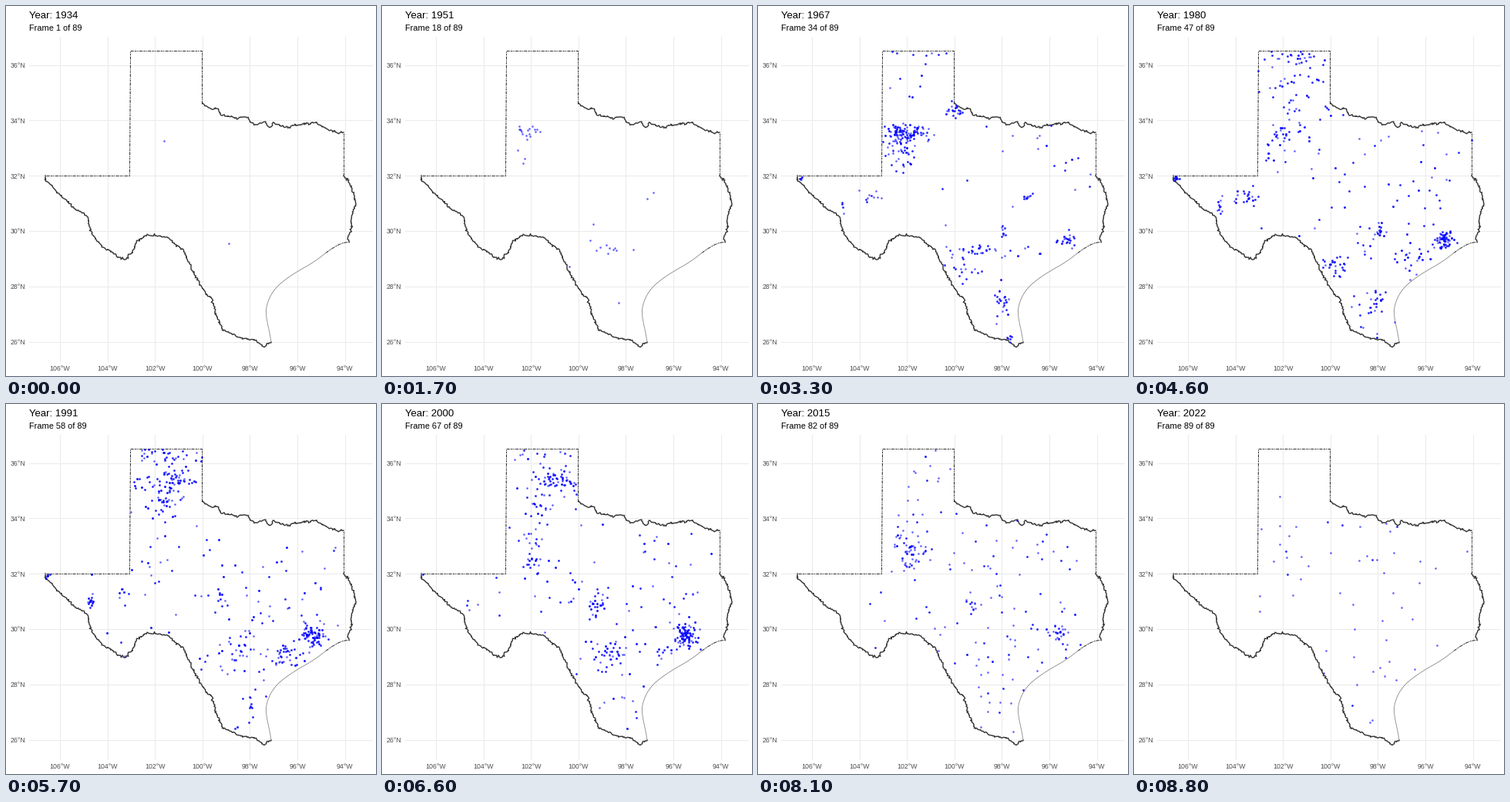
Animation, 480 px wide and 480 px high, one loop 8.9 s. Source, as a matplotlib script:

```python
import numpy as np
import matplotlib.pyplot as plt
from matplotlib.animation import FuncAnimation
from matplotlib.path import Path

SIZE, DPI = 480, 80
PT = 72 / DPI  # points per pixel
FRAMES, FIRST_YEAR = 89, 1934
GRID, TICK, BANK, BLACK = "#ebebeb", "#4d4d4d", "#383838", "#1c1c1c"
plt.rcParams["font.family"] = ["Liberation Sans", "DejaVu Sans"]

# Key points of each border piece, in stage pixels
RIO = [(51, 220), (51, 226), (58, 231), (66, 241), (87, 261), (105, 272),
       (110, 291), (117, 304), (127, 314), (138, 319), (145, 325), (156, 329),
       (165, 317), (170, 305), (184, 297), (209, 300), (219, 309), (230, 316),
       (236, 330), (249, 357), (261, 375), (268, 379), (272, 400), (281, 420),
       (305, 431), (325, 434), (334, 442), (344, 436)]
COAST = [(344, 436), (342, 424), (338, 406), (337, 392), (343, 375),
         (354, 361), (375, 346), (400, 332), (419, 317), (434, 308),
         (445, 306)]
SABINE = [(445, 306), (443, 301), (448, 291), (448, 273), (454, 257),
          (451, 244), (445, 228), (438, 220)]
RED = [(254.5, 127), (266, 134), (275, 133), (279, 141), (300, 146),
       (305, 144), (315, 145), (317, 152), (325, 154), (336, 150), (343, 158),
       (347, 152), (366, 158), (373, 155), (402, 151), (412, 158), (428, 164),
       (438, 164)]
PANHANDLE = [(254.5, 127), (254.5, 58.5), (161.5, 58.5), (160.5, 220.5),
             (51, 220.5)]
EAST = [(438, 220), (438, 164)]
STATE = Path(RIO + COAST + SABINE + EAST + RED[::-1] + PANHANDLE)

# Drilling areas: x, y, spread x, spread y, strength, peak year
AREAS = np.array([
    (210, 66, 30, 6, 12, 1983), (225, 96, 14, 8, 10, 1997),
    (190, 105, 16, 10, 6, 1982), (205, 128, 9, 10, 6, 1990),
    (190, 164, 14, 7, 18, 1966), (185, 190, 11, 12, 8, 1970),
    (195, 192, 9, 15, 10, 2010), (255, 134, 5, 6, 4, 1966),
    (147, 247, 8, 6, 5, 1976), (110, 258, 2, 7, 3, 1982),
    (54, 223, 2, 2, 3, 1979), (262, 338, 11, 9, 6, 1976),
    (285, 316, 19, 4, 7, 1963), (319, 290, 3, 6, 4, 1978),
    (350, 247, 3, 3, 2, 1964), (402, 302, 6, 6, 15, 1980),
    (392, 299, 5, 7, 11, 2000), (361, 325, 14, 8, 8, 1985),
    (314, 385, 7, 10, 7, 1974), (320, 433, 5, 2, 2, 1966),
    (298, 322, 12, 12, 6, 1997), (280, 260, 5, 8, 4, 2004)])
AREA_SPAN = 12  # years over which an area rises and fades


def wells(year):
    """Well sites of one year, seeded by the year."""
    rng = np.random.default_rng(year)
    total = np.interp(year, (1934, 1951, 1967, 1991, 2009, 2022),
                      (2, 35, 330, 400, 350, 55))
    scattered = np.interp(year, (1934, 1967, 1980, 2009, 2022),
                          (0, 0.15, 0.3, 0.4, 0.9))
    x, y, sx, sy, strength, peak = AREAS.T
    weight = strength * np.exp(-((year - peak) / AREA_SPAN) ** 2)
    area = rng.choice(len(AREAS), 1500, p=weight / weight.sum())
    local = rng.normal(np.c_[x, y][area], np.c_[sx, sy][area])
    wide = np.c_[rng.triangular(80, 400, 445, 1500),
                 rng.uniform(60, 430, 1500)]
    sites = np.where(rng.random((1500, 1)) < scattered, wide, local)
    sites = sites[STATE.contains_points(sites)][:int(total)]
    # Busy years have more than one well on many sites
    extra = rng.binomial(2, 0.5 * total / 400, len(sites))
    return np.repeat(sites, 1 + extra, axis=0)


def smooth(points, rounds=3):
    """Round off corners by repeated corner cutting."""
    p = np.array(points, float)
    for _ in range(rounds):
        a, b = p[:-1], p[1:]
        cut = np.stack([0.75 * a + 0.25 * b, 0.25 * a + 0.75 * b], 1)
        p = np.vstack([p[:1], cut.reshape(-1, 2), p[-1:]])
    return p


def rough(points, seed, amount=0.65, step=1.4):
    """Resample a line finely and make it ragged like a river bank."""
    p = np.array(points, float)
    d = np.r_[0, np.cumsum(np.hypot(*np.diff(p, axis=0).T))]
    t = np.arange(0, d[-1], step)
    xy = np.c_[np.interp(t, d, p[:, 0]), np.interp(t, d, p[:, 1])]
    noise = np.random.default_rng(seed).normal(0, amount, xy.shape)
    return np.vstack([xy + noise, p[-1:]])


fig = plt.figure(figsize=(SIZE / DPI, SIZE / DPI), dpi=DPI, facecolor="white")
ax = fig.add_axes([0, 0, 1, 1])
ax.set(xlim=(0, SIZE), ylim=(SIZE, 0))
ax.axis("off")


def line(points, color, width, **kw):
    x, y = np.array(points).T
    ax.plot(x, y, color=color, lw=width * PT, zorder=kw.pop("zorder", 2), **kw)


def label(x, y, text, px, color, ha="left"):
    return ax.text(x, y, text, fontsize=px * PT, color=color, ha=ha,
                   va="baseline")


for k in range(7):
    x = 70 + 61.6 * k
    line([(x, 40), (x, 461)], GRID, 1.07, zorder=1)
    label(x, 473, f"{106 - 2 * k}°W", 8.8, TICK, "center")
for k in range(6):
    y = 76.5 + 71.9 * k
    line([(30, y), (475, y)], GRID, 1.07, zorder=1)
    label(25.3, y + 3.2, f"{36 - 2 * k}°N", 8.8, TICK, "right")

for seed, bank in enumerate((RIO, SABINE, RED)):
    line(rough(bank, seed), BANK, 1.45)
for side in (PANHANDLE, EAST):
    line(side, "#b4b4b4", 0.8)
    line(side, BLACK, 0.9, dashes=(4, 2, 1, 1.5, 2, 2), dash_capstyle="butt")
shore = smooth(COAST)
line(shore, "#8c8c8c", 0.85)
line(shore[shore[:, 0] > 415], BANK, 0.9, dashes=(4, 3, 1, 2),
     dash_capstyle="butt")

title = label(30, 16.4, "", 13.2, "black")
subtitle = label(30, 32.3, "", 11, "black")
dots = ax.scatter([], [], s=(2.6 * PT) ** 2, c="blue", alpha=0.62, lw=0,
                  zorder=3)


def draw(i):
    title.set_text(f"Year: {FIRST_YEAR + i}")
    subtitle.set_text(f"Frame {i + 1} of {FRAMES}")
    dots.set_offsets(wells(FIRST_YEAR + i))
    return title, subtitle, dots


anim = FuncAnimation(fig, draw, frames=FRAMES, interval=100,
                     init_func=lambda: draw(0), repeat=True, repeat_delay=0)
plt.show()
```
